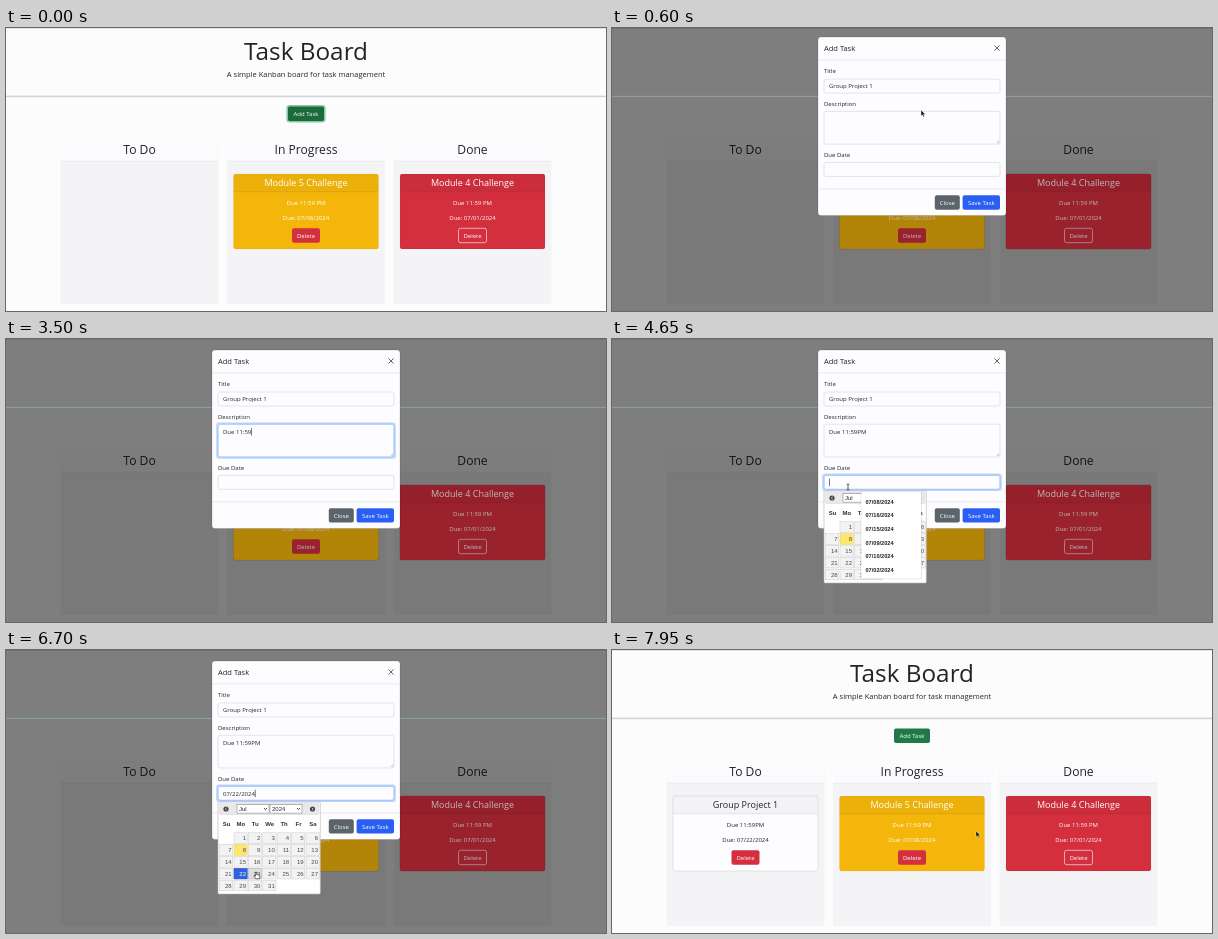
Animation of 600x283 px, one loop 8 s. Source, as an HTML page:

```html
<!DOCTYPE html>
<html lang="en">
<head>
<meta charset="utf-8">
<title>Task Board</title>
<style>
  html, body { margin: 0; width: 100%; height: 100%; overflow: hidden; background: #fdfcfd; }
  svg { display: block; width: 600px; height: 283px; }
  text { font: 6px "Open Sans", "Noto Sans", sans-serif; fill: #212529; white-space: pre; }
  .mid { text-anchor: middle; }
  .light { fill: #fff; }
  .h1 { font-size: 24.3px; }
  .lead { font-size: 7.5px; }
  .h2 { font-size: 12.1px; }
  .h4 { font-size: 9px; }
  .field { fill: #fdfcfe; stroke: #d3d4dc; stroke-width: .6; }
  .ring { fill: none; stroke: #bdd6fc; stroke-width: 1.6; }
  .focus { fill: none; stroke: #86b7fe; stroke-width: .7; }
  .picker text, .list text { font-family: "Liberation Sans", Arial, sans-serif; }
  .picker .day { text-anchor: end; fill: #454545; }
  .picker .head { text-anchor: middle; font-weight: bold; fill: #333; }
  .list text { font-size: 5.6px; font-weight: bold; fill: #222; }

  .dim, .cardDim { opacity: 0; animation: dim 8s linear infinite; }
  .modal { animation: fade 8s linear infinite, slide 8s ease-out infinite; }
  .pointer { animation: point 8s ease-in-out infinite; }

  @keyframes dim {
    0%, 5.19% { opacity: 0; }
    6.125%, 97.96% { opacity: 1; }
    98.9%, 100% { opacity: 0; }
  }
  @keyframes fade {
    0%, 6.125% { opacity: 0; }
    7.06%, 97.025% { opacity: 1; }
    97.96%, 100% { opacity: 0; }
  }
  @keyframes slide {
    0%, 6.125% { transform: translateY(-18.8px); }
    8%, 97.025% { transform: none; }
    98.9%, 100% { transform: translateY(-18.8px); }
  }
  @keyframes point {
    0%, 11.25% { transform: translate(309px, 82px); }
    15%, 16.25% { transform: translate(262px, 59px); }
    20%, 51.25% { transform: translate(241px, 97px); }
    54.5%, 65% { transform: translate(236px, 148px); }
    77%, 81.5% { transform: translate(237px, 222px); }
    83.5%, 85.5% { transform: translate(250px, 222px); }
    93%, 97.8% { transform: translate(370px, 177px); }
    99.2%, 100% { transform: translate(364px, 181px); }
  }
</style>
</head>
<body>
<svg id="stage" viewBox="0 0 600 283" xmlns="http://www.w3.org/2000/svg"></svg>
<script>
const LOOP = 8000;
const range = n => [...Array(n).keys()];
const text = (x, y, str, cls = '', id = '') => `<text x="${x}" y="${y}" class="${cls}" id="${id}">${str}</text>`;
const rect = (x, y, w, h, fill, more = '') =>
  `<rect x="${x}" y="${y}" width="${w}" height="${h}" fill="${fill}" ${more}/>`;
const box = (x, y, w, h, cls) => rect(x, y, w, h, 'none', `rx="2" class="${cls}"`);
const button = (cx, y, w, label, fill, more = '') =>
  rect(cx - w / 2, y, w, 14.4, fill, `rx="2" ${more}`) + text(cx, y + 9.4, label, 'mid light');
const group = (cls, body, id = '') => `<g class="${cls}" id="${id}">${body}</g>`;
const focusBox = (id, x, y, w, h) =>
  group('', box(x - 1, y - 1, w + 2, h + 2, 'ring') + box(x, y, w, h, 'focus'), id);

const column = (cx, title) =>
  rect(cx - 79, 111, 158, 165, '#f4f3f5') + rect(cx - 79, 111, 158, 22, '#fbfafc') +
  rect(cx - 79, 132.8, 158, .6, '#e4e3e6') + text(cx, 126.2, title, 'mid h2');

function card(cx, fill, title, due, date, plain, outline) {
  const cls = plain ? 'mid' : 'mid light';
  return rect(cx - 72.5, 146, 145, 75, fill, `rx="2" stroke="#000" stroke-opacity="${plain ? .15 : .06}" stroke-width=".6"`) +
    rect(cx - 72.5, 146, 145, 18, '#000', 'rx="2" opacity=".035"') +
    rect(cx - 72.5, 163.6, 145, .6, '#000', 'opacity=".13"') +
    text(cx, 158.2, title, cls + ' h4') + text(cx, 176.7, due, cls) + text(cx, 191.7, 'Due: ' + date, cls) +
    button(cx, 200.3, 28, 'Delete', '#d32f3f', outline ? 'stroke="#fff" stroke-width=".6"' : '');
}
const cardDim = cx => rect(cx - 72.8, 145.7, 145.6, 75.6, '#000', 'rx="2" class="cardDim" fill-opacity=".27"');

function picker() {
  const colX = c => 213.6 + c * 14.4;
  const arrow = (x, dir) => `<circle cx="${x}" cy="159" r="2.6" fill="#444"/>
    <path d="M${x - dir * .7} 157.7l${dir * 1.4} 1.3l${-dir * 1.4} 1.3" fill="none" stroke="#fff" stroke-width=".7"/>`;
  const select = (x, label) => rect(x, 154.7, 32, 8.4, '#fff', 'stroke="#777" stroke-width=".5"') +
    text(x + 2, 161, label) +
    `<path d="M${x + 27} 158l1.5 1.7l1.5-1.7" fill="none" stroke="#222" stroke-width=".8"/>`;
  const day = i => {
    const n = i + 1, x = colX(n % 7), y = 182.8 + Math.floor(n / 7) * 11.85;
    const today = n === 8;
    return rect(x, y, 13.2, 10.6, today ? '#fde56f' : '#f3f3f4',
      `stroke="${today ? '#e3cd62' : '#c9c9cc'}" stroke-width=".5"`) +
      text(x + 12, y + 7.5, n, 'day');
  };
  const x22 = colX(1), x23 = colX(2), y = 182.8 + 3 * 11.85;
  return rect(212, 152, 102.3, 92, '#fff', 'stroke="#b5b5b8" stroke-width=".6" rx="1"') +
    rect(213.4, 153.4, 99.4, 11, '#e9e9ea', 'stroke="#d5d5d7" stroke-width=".5" rx="1"') +
    arrow(220, -1) + arrow(306.5, 1) + select(231, 'Jul') + select(264, '2024') +
    ['Su', 'Mo', 'Tu', 'We', 'Th', 'Fr', 'Sa'].map((d, c) => text(colX(c) + 6.9, 175.8, d, 'head')).join('') +
    range(31).map(day).join('') +
    group('', rect(x22, y, 13.2, 10.6, '#2f62dc', 'stroke="#1f4fc0" stroke-width=".5"') +
      `<text x="${x22 + 12}" y="${y + 7.5}" class="day" style="fill:#fff">22</text>`, 'chosen') +
    group('', rect(x23, y, 13.2, 10.6, '#dededf', 'stroke="#b0b0b3" stroke-width=".5"') +
      text(x23 + 12, y + 7.5, 23, 'day'), 'hovered');
}

const dates = ['08', '16', '15', '09', '10', '02'];
const list = rect(248.6, 152.6, 61.4, 87.6, '#000', 'rx="2" opacity=".12"') +
  rect(249.2, 152.8, 60, 86.6, '#fff', 'rx="1.5"') +
  dates.map((d, i) => text(253.5, 164.6 + i * 13.65, `07/${d}/2024`)).join('');

const modal = rect(206, 11, 188, 178.5, '#fdfcfe', 'rx="3" stroke="#000" stroke-opacity=".25" stroke-width=".5"') +
  text(212, 25, 'Add Task', 'lead') +
  '<path d="M382.4 19.4l5.2 5.2m0-5.2l-5.2 5.2" stroke="#555" stroke-width=".9"/>' +
  rect(206, 33.6, 188, .6, '#dcdce1') + rect(206, 162.6, 188, .6, '#dcdce1') +
  text(212, 47.2, 'Title') + text(212, 80, 'Description') + text(212, 130.7, 'Due Date') +
  box(212, 53, 176, 14, 'field') + box(212, 85.2, 176, 32.8, 'field') + box(212, 136.3, 176, 14, 'field') +
  '<path d="M384.6 117l2.6-2.6m-1 2.6l1-1" stroke="#777" stroke-width=".4"/>' +
  focusBox('descFocus', 212, 85.2, 176, 32.8) + focusBox('dateFocus', 212, 136.3, 176, 14) +
  text(217, 62.2, '', '', 'title') + text(217, 94.7, '', '', 'desc') + text(217, 145.5, '', '', 'date') +
  rect(0, 0, .6, 7.4, '#222', 'id="caret"') +
  button(335.3, 169.2, 25, 'Close', '#5c646b') + button(369.3, 169.2, 37.4, 'Save Task', '#2a5ff3') +
  group('', rect(349.8, 168.4, 39, 16, 'none', 'rx="3" stroke="#6f9df8" stroke-width="1.5"'), 'saveFocus') +
  group('picker', picker(), 'picker') + group('list', list, 'list');

const pointer =
  group('', '<path d="M0 0v6l1.4-1.2l1 2.2l1-.5l-1-2.1h1.9z" fill="#111" stroke="#fff" stroke-width=".4"/>', 'arrow') +
  group('', '<path d="M-1.3-3q1.3 0 1.3.8q0-.8 1.3-.8M0-2.4v4.8M-1.3 3q1.3 0 1.3-.8q0 .8 1.3 .8" fill="none" stroke="#222" stroke-width=".7"/>', 'beam') +
  group('', '<path d="M-.6.4q.6-.8 1.2 0v2.2l2.6.6q.8.3.7 1.1l-.5 2.5h-3.6l-1.9-2.5q-.2-.9.7-.7l.8.7z" fill="#fff" stroke="#111" stroke-width=".6"/>', 'hand');

document.getElementById('stage').innerHTML =
  rect(0, 0, 600, 283, '#fdfcfd') + rect(0, 0, 600, .8, '#dfdee2') + rect(0, 67.6, 600, 1.6, '#d3d3d7') +
  text(300, 32, 'Task Board', 'mid h1') + text(300, 49.2, 'A simple Kanban board for task management', 'mid lead') +
  button(300, 78.6, 36, 'Add Task', '#1f7a45') +
  group('', rect(281.2, 77.8, 37.6, 16, '#1b6a3a', 'rx="2.5" stroke="#8fc7a8" stroke-width="1.6"') +
    text(300, 88, 'Add Task', 'mid light'), 'addFocus') +
  column(133.5, 'To Do') + column(300, 'In Progress') + column(466.5, 'Done') +
  group('', card(133.5, '#fdfcfe', 'Group Project 1', 'Due 11:59PM', '07/22/2024', true), 'newCard') +
  group('dim', rect(0, 0, 600, 283, '#000', 'opacity=".5"') + rect(0, 67.6, 600, 1.6, '#8b9b9f')) +
  card(300, '#f5b60b', 'Module 5 Challenge', 'Due 11:59 PM', '07/08/2024') + cardDim(300) +
  card(466.5, '#d32f3d', 'Module 4 Challenge', 'Due 11:59 PM', '07/01/2024', false, true) + cardDim(466.5) +
  group('modal', modal) + group('pointer', pointer);

const el = Object.fromEntries([...document.querySelectorAll('[id]')].filter(e => e.id).map(e => [e.id, e]));

// Time spans in which each part is on show.
const spans = {
  addFocus: [[0, 700]],
  descFocus: [[1550, 4400]],
  dateFocus: [[4400, 7680]],
  picker: [[4430, 6900]],
  list: [[4480, 5250]],
  chosen: [[6350, 6900]],
  hovered: [[6600, 6900]],
  saveFocus: [[7680, LOOP]],
  newCard: [[7750, LOOP]],
  arrow: [[490, 1100], [6950, 7350], [7840, LOOP]],
  beam: [[1100, 2300], [4100, 5350]],
  hand: [[50, 490], [5350, 6950], [7350, 7840]]
};
const within = (t, [from, to]) => t >= from && t < to;
const note = 'Due 11:59PM';

function caretAt(field, y, on) {
  el.caret.setAttribute('x', 217 + field.getComputedTextLength());
  el.caret.setAttribute('y', y);
  el.caret.style.display = on ? '' : 'none';
}

function draw(t) {
  for (const id in spans) el[id].style.display = spans[id].some(s => within(t, s)) ? '' : 'none';
  const filled = t < 7750;
  const typed = Math.max(0, Math.floor((t - 2300) / 140) + 1);
  el.title.textContent = filled ? 'Group Project 1' : '';
  el.desc.textContent = filled ? note.slice(0, typed) : '';
  el.date.textContent = filled && t >= 6350 ? '07/22/2024' : '';
  const blink = from => (t - from) % 1000 < 500;
  if (within(t, [1550, 4400])) caretAt(el.desc, 89.2, within(t, [2300, 3900]) || blink(1500));
  else if (within(t, [4400, 7680])) caretAt(el.date, 139.7, blink(t < 6350 ? 4400 : 6350));
  else el.caret.style.display = 'none';
}

let start;
function tick(now) {
  start ??= now;
  draw((now - start) % LOOP);
  requestAnimationFrame(tick);
}
draw(0);
requestAnimationFrame(tick);
</script>
</body>
</html>
```
